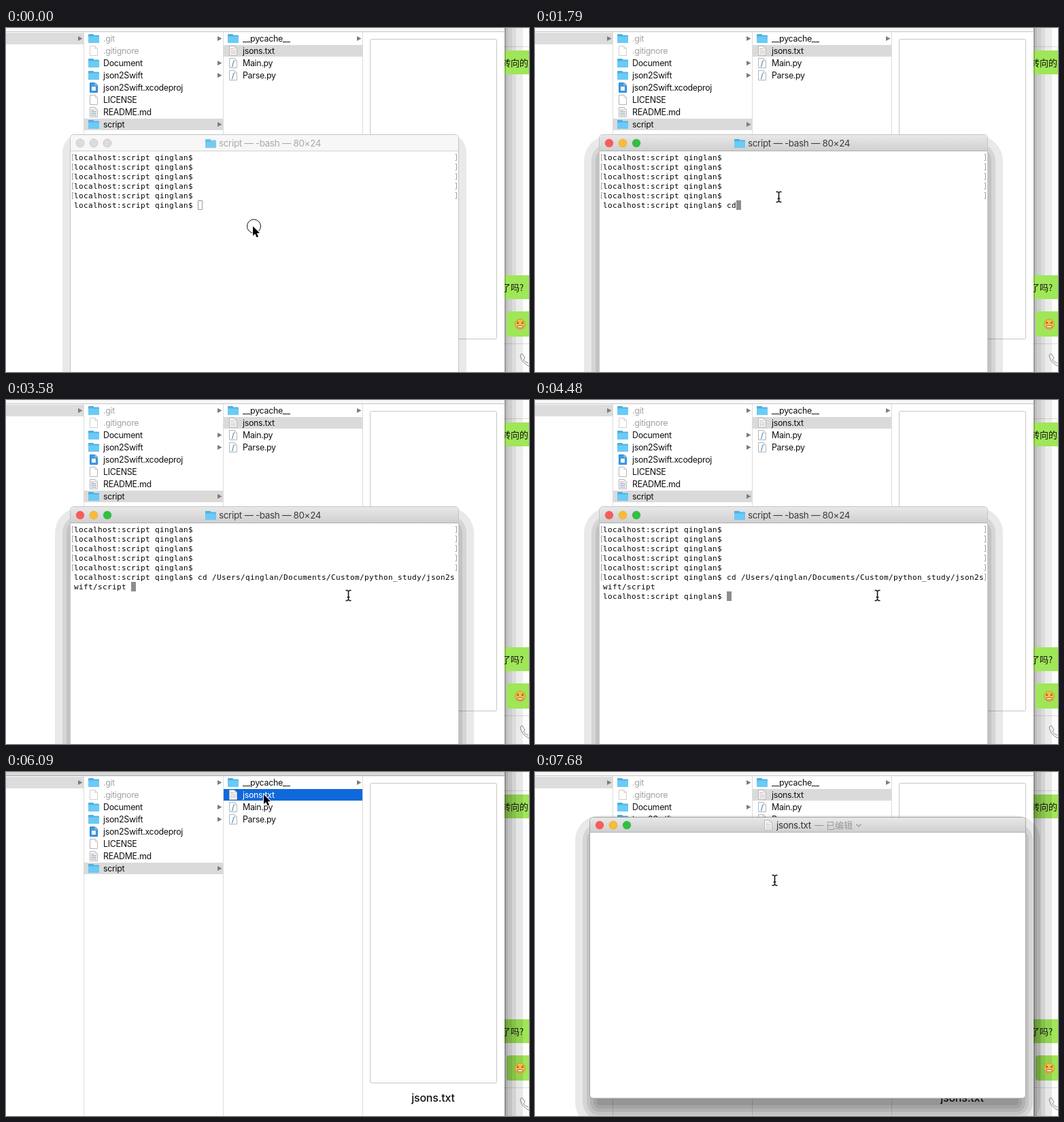
An HTML page with a canvas for the animation above (8 s loop, 769 by 505 pixels).

```html
<!DOCTYPE html>
<html lang="en">
<head>
<meta charset="utf-8">
<title>Drag a folder into the terminal</title>
<style>
html, body { margin: 0; width: 100%; height: 100%; overflow: hidden; background: #fff; }
canvas { display: block; }
</style>
</head>
<body>
<canvas id="stage" width="769" height="505"></canvas>
<script>
const c = document.getElementById('stage').getContext('2d');
const LOOP = 8000, STEP = 178.6;
const UI = 'Inter, Roboto, sans-serif';
const CJK = '"Noto Sans CJK SC", "Noto Sans CJK", sans-serif';
const MONO = '11px "DejaVu Sans Mono", monospace';
const PROMPT = 'localhost:script qinglan$ ';
const PATH = '/Users/qinglan/Documents/Custom/python_study/json2swift/script ';

// pointer path: step, x, y
const pointer = [
  [0, 362.5, 291], [1, 363, 290], [4, 387, 268], [8, 387, 268], [9, 378, 261],
  [10, 358, 248], [12, 275, 195], [14, 178, 135], [16, 185, 149], [17, 185, 149],
  [20, 503, 287], [28, 503, 287], [30, 470, 220], [33, 378.5, 33], [34, 378.5, 33],
  [35, 343, 88], [38, 351, 142], [40, 352, 159]
];

function rect(x, y, w, h, fill) {
  c.fillStyle = fill;
  c.fillRect(x, y, w, h);
}

function box(x, y, w, h, r, fill, stroke, line = 1) {
  c.beginPath();
  c.roundRect(x, y, w, h, r);
  if (fill) { c.fillStyle = fill; c.fill(); }
  if (stroke) { c.strokeStyle = stroke; c.lineWidth = line; c.stroke(); }
}

function disc(x, y, r, fill, stroke) {
  c.beginPath();
  c.arc(x, y, r, 0, 7);
  if (fill) { c.fillStyle = fill; c.fill(); }
  if (stroke) { c.strokeStyle = stroke; c.lineWidth = 1; c.stroke(); }
}

function lines(points, stroke, width = 1) {
  c.beginPath();
  points.forEach(([x, y], i) => i ? c.lineTo(x, y) : c.moveTo(x, y));
  c.strokeStyle = stroke;
  c.lineWidth = width;
  c.stroke();
}

function text(s, x, y, fill = '#111', font = '12.4px ' + UI, gap = -.3) {
  c.font = font;
  c.letterSpacing = gap + 'px';
  c.fillStyle = fill;
  c.fillText(s, x, y);
}

function shadow(x, y, w, h, spreads, drop, alpha) {
  for (const s of spreads)
    box(x - s, y + drop - s, w + 2 * s, h + 2 * s, Math.max(4, s + 14), `rgba(0,0,0,${alpha})`);
}

function vertical(y0, y1, a, b) {
  const g = c.createLinearGradient(0, y0, 0, y1);
  g.addColorStop(0, a);
  g.addColorStop(1, b);
  return g;
}

function lights(x, y, on) {
  ['#fc5b57', '#fcbc30', '#2fc140'].forEach((col, i) =>
    disc(x + 20 * i, y, 6, on ? col : '#dcdcdc', on ? 'rgba(0,0,0,.1)' : '#cacaca'));
}

function folder(x, y) {
  box(x, y, 8, 5, 1, '#45aee0');
  box(x, y + 1.5, 16, 11.5, 1, '#4eb3e4');
  box(x, y + 3.5, 16, 9.5, 1, '#6ccaf6');
}

function page(x, y, kind) {
  const project = kind == 'project';
  c.beginPath();
  [[0, 0], [7.5, 0], [11, 3.5], [11, 14], [0, 14]].forEach(([a, b]) => c.lineTo(x + a + .5, y + b + .5));
  c.closePath();
  c.fillStyle = project ? '#3d9ae6' : '#fff';
  c.fill();
  c.strokeStyle = project ? '#2f86d0' : kind == 'faint' ? '#d0d0d0' : '#b4b4b4';
  c.lineWidth = 1;
  c.stroke();
  lines([[x + 8, y + .5], [x + 8, y + 4], [x + 11.5, y + 4]], '#c8c8c8');
  if (project) box(x + 3, y + 6, 6, 6, 1, '#e8f3fc');
  if (kind == 'text' || kind == 'marked')
    for (let i = 0; i < 4; i++)
      rect(x + 2, y + 4 + i * 2.5, i ? 8 : 5, 1, kind == 'text' ? '#b8b8b8' : ['#d88', '#68a', '#7a9', '#88b'][i]);
  if (kind == 'code') lines([[x + 8, y + 4], [x + 6.5, y + 5], [x + 5, y + 12], [x + 4, y + 13]], '#4a9ad0', 1.2);
}

function arrow(x, y) {
  c.beginPath();
  c.moveTo(x, y - 3.5);
  c.lineTo(x + 6.5, y);
  c.lineTo(x, y + 3.5);
  c.fillStyle = '#7c7c7c';
  c.fill();
}

function list(x, rows) {
  rows.forEach(([name, icon, more, fill], i) => {
    const y = 15.5 + 18 * i;
    icon == 'folder' ? folder(x, y - 6.5) : page(x + 2, y - 7.5, icon);
    text(name, x + 22, y + 4.5, fill);
    if (more) arrow(x + 190, y);
  });
}

function bubbles() {
  rect(730, 33, 39, 35, '#9fe658');
  rect(730, 363, 39, 35, '#9fe658');
  box(736, 416, 40, 37, 4, '#9fe658');
}

function chat(banded) {
  rect(730, 0, 39, 505, '#fdfdfd');
  rect(733, 27, 36, 1, '#dedede');
  rect(733, 463, 36, 1, '#dedede');
  if (banded) bubbles();
  for (const w of [27, 17, 11, 5]) rect(733, 0, w, 505, `rgba(0,0,0,${banded ? .085 : .065})`);
  if (!banded) bubbles();
  rect(733, 0, 2, 505, 'rgba(0,0,0,.2)');
  text('转向的', 729, 56, '#111', '13px ' + CJK, 0);
  text('了吗?', 729, 386, '#111', '13px ' + CJK, 0);

  disc(756, 435, 7.5, '#f4bc48', '#d69a30');
  lines([[751, 431], [754, 433], [751, 434]], '#7a4a14');
  lines([[761, 431], [758, 433], [761, 434]], '#7a4a14');
  box(752, 437, 8, 3, 1, '#fff', '#9a5a1c');

  c.beginPath();
  c.moveTo(756, 480);
  c.quadraticCurveTo(757, 491, 770, 497);
  c.moveTo(756, 480);
  c.lineTo(759, 478);
  c.lineTo(763, 484);
  c.lineTo(761, 487);
  c.quadraticCurveTo(763, 491, 768, 492);
  c.strokeStyle = '#888';
  c.lineWidth = 1;
  c.stroke();
}

function finder(front, dragging) {
  rect(0, 0, 733, 505, '#fff');
  rect(0, 0, 733, 6, front ? '#d8d8d8' : '#f7f7f7');
  rect(0, 5, 733, 1, front ? '#a8a8a8' : '#c4c4c4');
  for (const x of [114, 319, 524]) rect(x, 6, 1, 499, '#dcdcdc');
  rect(0, 7, 114, 17, '#dcdcdc');
  arrow(106, 15.5);
  rect(115, 133, 204, 17, '#dadada');
  rect(320, 25, 204, 17, front ? '#1069da' : '#dadada');
  if (dragging) {
    lines([[116, 505], [116, 7.5], [318, 7.5], [318, 505]], '#a6cdf7', 2.5);
    box(139, 132, 41, 17, 8, '#1a68d6');
  }
  const grey = '#a2a2a2';
  list(121, [
    ['.git', 'folder', 1, grey],
    ['.gitignore', 'faint', 0, grey],
    ['Document', 'folder', 1],
    ['json2Swift', 'folder', 1],
    ['json2Swift.xcodeproj', 'project'],
    ['LICENSE', 'plain'],
    ['README.md', 'marked'],
    ['script', 'folder', 1, dragging ? '#fff' : undefined]
  ]);
  list(326, [
    ['__pycache__', 'folder', 1],
    ['jsons.txt', 'text', 0, front ? '#fff' : undefined],
    ['Main.py', 'code'],
    ['Parse.py', 'code']
  ]);
  box(535.5, 16.5, 186, 440, 2, null, '#c6c6c6');
  c.textAlign = 'center';
  text('jsons.txt', 628, 484, '#111', '500 16px ' + UI, -.2);
  c.textAlign = 'left';
}

function terminal(k) {
  const on = k > 0, x = 95, y = 157;
  shadow(x, y, 570, 400, on ? [23, 12, 6] : [12], on ? 24 : 11, .085);
  box(x - .5, y - .5, 571, 400, 5, '#fff', '#c4c4c4');
  box(x, y, 570, 23, [5, 5, 0, 0], on ? vertical(157, 180, '#e8e8e8', '#d0d0d0') : '#f7f7f7');
  rect(x, 180, 570, 1, on ? '#b0b0b0' : '#d0d0d0');
  lights(109, 169, on);
  c.globalAlpha = on ? 1 : .65;
  folder(293, 163);
  c.globalAlpha = 1;
  text('script — -bash — 80×24', 313, 174, on ? '#3c3c3c' : '#aaa', '13.4px ' + UI, -.3);

  const rows = Array(5).fill(PROMPT);
  const typed = k < 5 ? '' : k < 6 ? 'c' : k < 12 ? 'cd' : k < 20 ? 'cd ' : 'cd ' + PATH;
  const command = PROMPT + typed;
  rows.push(command.slice(0, 80));
  if (command.length > 80) rows.push(command.slice(80));
  if (k >= 25) rows.push(PROMPT);
  if (k >= 27) rows.push(PROMPT);
  const last = rows.length - 1;
  rows.forEach((row, i) => {
    const base = 194 + 14 * i;
    text(row, 100, base, '#000', MONO, .378);
    const open = i == last || i == 6 || (i == 5 && k < 25);
    if (!open) {
      lines([[99, base - 8.5], [97.5, base - 8.5], [97.5, base + .5], [99, base + .5]], '#a0a0a0');
      lines([[660.5, base - 8.5], [662.5, base - 8.5], [662.5, base + .5], [660.5, base + .5]], '#a0a0a0');
    }
  });
  const cx = 100 + 7 * rows[last].length, cy = 254 + 14 * (last - 5);
  if (on) rect(cx, cy - 1, 7, 14, '#8e8e8e');
  else box(cx + .5, cy - .5, 6, 13, 0, null, '#999');
  if (k == 18 || k == 19) box(96.5, 182.5, 567, 340, 0, null, '#a6cdf7', 3);
}

function editor(k) {
  shadow(81, 66, 640, 413, [22, 11, 5, 0, -5, -10], 20, .085);
  box(80.5, 66.5, 641, 412.5, 5, '#fff', '#a4a4a4');
  box(81, 67, 640, 21, [5, 5, 0, 0], vertical(67, 88, '#e8e8e8', '#d0d0d0'));
  rect(81, 88, 640, 1, '#b4b4b4');
  lights(95, 78, true);
  page(337, 70.5, 'text');
  text('jsons.txt', 355, 83, '#333', '13.4px ' + UI, -.3);
  text('—', 411, 83, '#999', '13.4px ' + UI, 0);
  text('已编辑', 428, 83, '#999', '13px ' + CJK, 0);
  lines([[472.5, 76.5], [476, 80], [479.5, 76.5]], '#999', 1.3);
  if (k < 38 || (k >= 40 && k < 43)) rect(86, 89, 1, 13, '#000');
}

function place(k) {
  const n = pointer.findIndex(p => p[0] > k);
  if (n < 0) return pointer.at(-1).slice(1);
  const [a, x, y] = pointer[n - 1], [b, u, v] = pointer[n];
  const f = (k - a) / (b - a);
  return [x + (u - x) * f, y + (v - y) * f];
}

function drawPointer(k) {
  if (k == 5 || k == 6) return;
  const [x, y] = place(k);
  const dragging = k == 18 || k == 19;
  const beam = k > 0 && (k < 35 ? y > 181 && !dragging : k > 35);
  if (dragging) {
    c.globalAlpha = .6;
    folder(x - 64, y - 14);
    box(x - 46, y - 17, 41, 17, 8, '#1a68d6');
    text('script', x - 42, y - 4, '#fff');
    c.globalAlpha = 1;
  }
  if ([0, 17, 18, 19, 21, 33].includes(k))
    disc(x + (beam ? .5 : 2), y + (beam ? -1.5 : 0), 10, null, '#111');
  c.save();
  c.translate(Math.round(x), Math.round(y));
  if (beam) {
    for (const [col, w] of [['#fff', 3], ['#111', 1.3]]) {
      lines([[-3.5, -7.5], [-1, -7.5], [.5, -6], [.5, 6], [-1, 7.5], [-3.5, 7.5]], col, w);
      lines([[4.5, -7.5], [2, -7.5], [.5, -6], [.5, 6], [2, 7.5], [4.5, 7.5]], col, w);
      lines([[-1.5, 2.5], [2.5, 2.5]], col, w);
    }
  } else {
    c.beginPath();
    [[0, 0], [0, 14], [3.2, 11], [5.6, 16.3], [8, 15.2], [5.8, 10.2], [10, 10]].forEach(p => c.lineTo(...p));
    c.closePath();
    c.lineWidth = 2;
    c.strokeStyle = '#fff';
    c.stroke();
    c.fillStyle = '#000';
    c.fill();
  }
  c.restore();
}

function draw(now) {
  const k = Math.floor(now % LOOP / STEP);
  chat(k >= 34);
  finder(k == 34 || k == 35, k == 17);
  if (k < 34) terminal(k);
  if (k >= 35) editor(k);
  drawPointer(k);
  requestAnimationFrame(draw);
}
requestAnimationFrame(draw);
</script>
</body>
</html>
```
